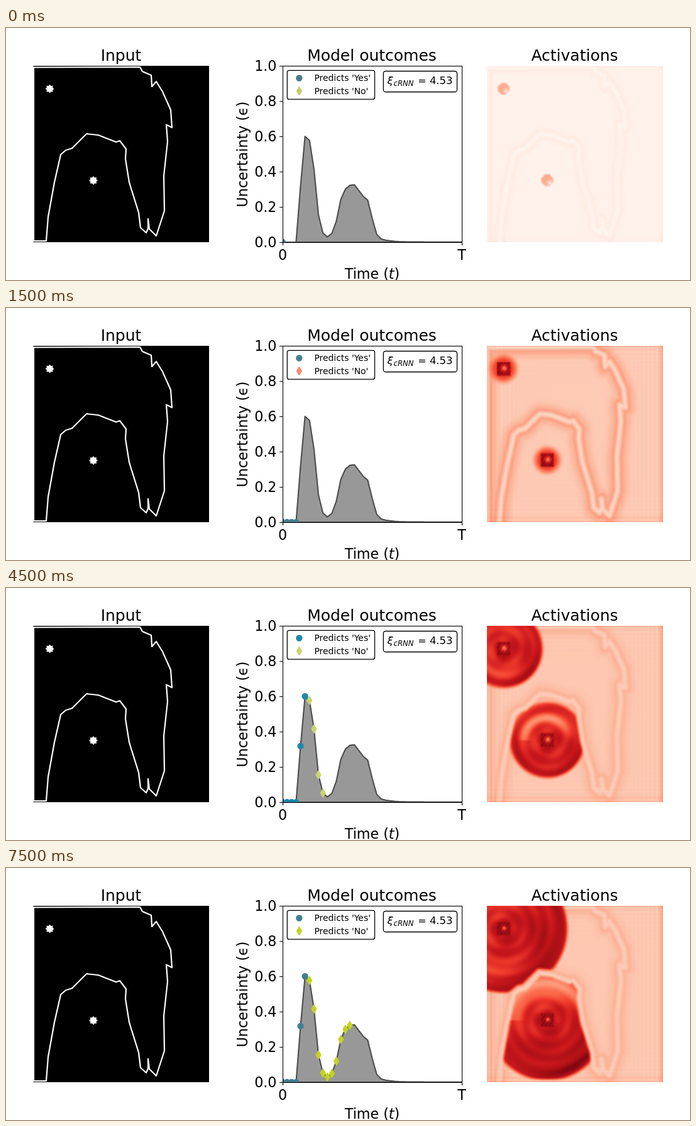
These frames come from a looping animation (1088 px wide and 400 px high, 8000 ms). An HTML page with a canvas:

```html
<!DOCTYPE html>
<html lang="en">
<head>
<meta charset="utf-8">
<title>Model outcomes</title>
<style>
  html, body { margin: 0; width: 100%; height: 100%; overflow: hidden; background: #fff; }
  svg { position: absolute; left: 0; top: 0; }
  canvas { position: absolute; left: 765px; top: 60px; width: 280px; height: 280px; }
  text { font-family: "DejaVu Sans", sans-serif; font-size: 22.22px; fill: #000; }
  .title { font-size: 25px; text-anchor: middle; }
  .mid { text-anchor: middle; }
  .end { text-anchor: end; }
  .key { font-size: 13.89px; }
  .score { font-size: 16.4px; }
  .sub { font-size: 11.67px; }
  .it { font-style: oblique; }
  .axis { fill: none; stroke: #000; stroke-width: 1.1; }
  .box { fill: #fff; stroke: #000; stroke-width: 1.3; }
  .mark { stroke-width: 2.08; stroke-linejoin: round; }
</style>
</head>
<body>
<svg width="1088" height="400" viewBox="0 0 1088 400">
  <defs>
    <clipPath id="axes"><rect x="440" y="60" width="285.5" height="280.5"/></clipPath>
    <filter id="soft"><feGaussianBlur stdDeviation="0.55"/></filter>
  </defs>
  <text class="title" x="183" y="52">Input</text>
  <text class="title" x="582" y="52">Model outcomes</text>
  <text class="title" x="904.5" y="52">Activations</text>

  <rect x="43.5" y="60" width="279.5" height="280"/>
  <path id="outline" fill="none" stroke="#fff" stroke-width="2.2" stroke-linejoin="round" filter="url(#soft)"/>
  <g id="stars" fill="#fff"></g>

  <g clip-path="url(#axes)">
    <path id="area" fill="#989898" stroke="#4c4c4c" stroke-width="2.1" stroke-linejoin="round"/>
    <g id="points"></g>
  </g>
  <path id="ticks" class="axis"/>
  <rect class="axis" x="440.5" y="60.5" width="285" height="280"/>
  <g id="tickLabels"></g>
  <text class="mid" x="440" y="368">0</text>
  <text class="mid" x="725" y="368">T</text>
  <text class="mid" x="582.5" y="398">Time (<tspan class="it">t</tspan>)</text>
  <text class="mid" transform="translate(383.5 200.5) rotate(-90)">Uncertainty (ϵ)</text>

  <rect class="box" x="447.3" y="67.3" width="139.2" height="45.9" rx="3"/>
  <g id="legend"></g>
  <text class="key" x="490.5" y="84.3">Predicts 'Yes'</text>
  <text class="key" x="490.5" y="104.5">Predicts 'No'</text>
  <rect class="box" x="600.3" y="68.5" width="117.2" height="33" rx="3.5"/>
  <text class="score it" x="606.5" y="89">ξ</text>
  <text class="sub it" x="616.5" y="91.5">cRNN</text>
  <text class="score" x="655" y="89">= 4.53</text>
</svg>
<canvas id="map" width="140" height="140"></canvas>

<script>
const STEP_MS = 500, STEPS = 16;
const { sin, cos, exp, abs, min, max, hypot, atan2, floor, PI } = Math;
const $ = id => document.getElementById(id);
const clamp = (x, lo = 0, hi = 1) => min(hi, max(lo, x));
const ramp = (a, b, x) => { const t = clamp((x - a) / (b - a)); return t * t * (3 - 2 * t); };
const bump = (x, w) => exp(-(x / w) * (x / w));
const mix = (a, b, t) => a + (b - a) * t;

// Outline corners; the inner arch also bounds the lower wave.
const head = [[44,338],[44,62.5],[213,62],[217,69],[231,75],[232,93],[239,85],[249,101],
  [262,130],[264,158],[255,153.5],[257,180],[251,235],[252,290],[239,330],[228,319],[226,303]];
const arch = [[226,318],[223,325],[214,317],[211,293],[196,245],[190,208],[191,192],[181,179],
  [175,181],[147,170],[128,168],[105,191],[95,194],[87,201],[77,245],[67,300],[64,338]];
$('outline').setAttribute('d', 'M' + [...head, ...arch].join('L') + 'Z');

function star(cx, cy) {
  const pts = Array.from({ length: 16 }, (_, i) => {
    const r = i % 2 ? 5 : 7, a = i * PI / 8;
    return [cx + r * cos(a), cy + r * sin(a)];
  });
  return `<polygon points="${pts.join(' ')}"/>`;
}
$('stars').innerHTML = star(69.5, 96.5) + star(139, 242);

// Uncertainty: flat start, two peaks, decaying tail
const START = 4, FIRST_NO = 6;
const peaks = [.318, .6, .577, .415, .155, .052, .03, .05, .12, .243, .3, .322, .326, .293, .26, .238, .135, .045];
const curve = Array.from({ length: 41 }, (_, i) =>
  i < START ? 0 : peaks[i - START] ?? .001 + .018 * exp((START + peaks.length - i) / 2));
const px = i => 440 + i * 7.125, py = v => 340 - v * 280;
$('area').setAttribute('d', 'M440,340L' + curve.map((v, i) => [px(i), py(v)]).join('L') + 'L725,340Z');

let ticks = 'M440.5,340v5M725.5,340v5', labels = '';
for (let v = 0; v <= 5; v++) {
  const y = py(v / 5);
  ticks += `M440,${y + .5}h-5`;
  labels += `<text class="end" x="430.5" y="${y + 8}">${(v / 5).toFixed(1)}</text>`;
}
$('ticks').setAttribute('d', ticks);
$('tickLabels').innerHTML = labels;

// First step, 'Yes' colour, 'No' colour
const shades = [[0, '#4b7a89', '#c4cc70'], [1, '#507583', '#f87f60'], [2, '#467f8c', '#fb8a68'],
  [4, '#3f87a0', '#f59467'], [9, '#2187aa', '#c9d470'], [12, '#1a86a8', '#c3d421'],
  [14, '#417e90', '#c3d421']];
const mark = (shape, c) => `<${shape} class="mark" fill="${c}" stroke="${c}"/>`;
const dot = (x, y, c) => mark(`circle cx="${x}" cy="${y}" r="4.1"`, c);
const diamond = (x, y, c) => mark(`path d="M${x},${y - 5.9}l3.5,5.9l-3.5,5.9l-3.5,-5.9z"`, c);

function drawPlot(step) {
  const [, yes, no] = shades.filter(s => s[0] <= step).pop();
  $('legend').innerHTML = dot(466.3, 79.5, yes) + diamond(466.3, 100, no);
  $('points').innerHTML = curve.slice(0, step + 1)
    .map((v, i) => i < FIRST_NO ? dot(px(i), py(v), yes) : diamond(px(i), py(v), no)).join('');
}

// Activation map: a scalar field shown through a red colour scale
const N = 140, SIZE = 280;
const reds = ['fff5f0', 'fee0d2', 'fcbba1', 'fc9272', 'fb6a4a', 'ef3b2c', 'cb181d', 'a50f15', '67000d']
  .map(h => [0, 2, 4].map(k => parseInt(h.slice(k, k + 2), 16)));

function distance(x, y, pts) {
  let best = 1e9;
  for (let i = 1; i < pts.length; i++) {
    const [ax, ay] = pts[i - 1], dx = pts[i][0] - ax, dy = pts[i][1] - ay;
    const t = clamp(((x - ax) * dx + (y - ay) * dy) / (dx * dx + dy * dy));
    best = min(best, hypot(x - ax - t * dx, y - ay - t * dy));
  }
  return best;
}
function inside(x, y, pts) {
  let hit = false;
  pts.forEach(([ax, ay], i) => {
    const [bx, by] = pts[(i + 1) % pts.length];
    if (ay > y !== by > y && x < ax + (y - ay) / (by - ay) * (bx - ax)) hit = !hit;
  });
  return hit;
}
const region = [...arch, [64, 345], [226, 345]];
const cells = Array.from({ length: N * N }, (_, i) => {
  const u = (i % N) * 2 + 1, v = floor(i / N) * 2 + 1, x = u + 44, y = v + 60;
  const toArch = distance(x, y, arch), within = inside(x, y, region);
  return {
    u, v, line: min(toArch, distance(x, y, head)),
    inner: within ? ramp(0, 7, toArch) * ramp(1, 7, SIZE - v) : 0,
    outer: within ? 0 : ramp(4, 12, toArch)
  };
});

// Each wave: seed position, speed, limit, which side of the arch it fills,
// directions of its pale arc and its dark side
const waves = [
  { u: 26.5, v: 36.5, speed: 6.5, limit: 102, gate: 'outer', pale: 2, dark: .5, depth: .12 },
  { u: 96, v: 181.5, speed: 6.25, limit: 96, gate: 'inner', pale: -1.8, dark: 1.2, depth: .28 }
];

function background(c, step) {
  const grow = min(1, .35 + .35 * step);
  const spread = ramp(1, 3, step), late = ramp(3, 9, step);
  const right = SIZE - c.u, bottom = SIZE - c.v;
  const side = min(c.u, right), flat = min(c.v, bottom);
  let f = .21 - .19 * exp(-step);
  f += grow * ((.1 - .045 * late) * bump(c.line - 6.5, 3.2) - (.045 - .025 * late) * bump(c.line, 2.6));
  f += spread * (.06 - .035 * late) * bump(c.line - 12, 6);
  f += grow * (.12 * bump(right, 4.5) + .05 * bump(c.u, 4) + .04 * bump(flat, 4) + .03 * bump(bottom - 8, 2));
  f += spread * .025 * (cos(side * .95) * exp(-side / 24) + cos(flat * .95) * exp(-flat / 16));
  return f;
}

function addWave(f, c, w, step) {
  const R = min(4 + w.speed * step, w.limit), gate = c[w.gate];
  const dx = c.u - w.u, dy = c.v - w.v, r = hypot(dx, dy), a = atan2(dy, dx);
  if (step < 2 || !gate || r > R + 5) return f;
  const open = ramp(3, 7, step), aged = ramp(9, 15, step);
  let body = .46 + .026 * min(step, 10);
  // spiral texture, dark side, rim, hot core and the pale arc
  body += .07 * open * sin(2 * a + r * .11) * sin(r * .2 - a - step * .3);
  body += (.05 + .06 * aged) * open * cos(a - w.dark) * min(1, r / R * 1.5);
  body += .07 * open * bump(R - r - 9, 6) + .16 * bump(r, 14);
  body -= w.depth * open * bump(r - .6 * R, .1 * R + 2 + 4 * aged) * max(0, cos((a - w.pale) * .8));
  return mix(f, body, ramp(-4, step < 5 ? 10 : 5, R - r) * gate);
}

function addSeed(f, c, w, step) {
  const dx = c.u - w.u, dy = c.v - w.v, reach = max(abs(dx), abs(dy));
  const grain = sin(dx * 1.7 + dy * .6) * sin(dy * 1.3 - dx * .4);
  if (step < 2) {
    const heat = step ? .9 : .3;
    const shape = ramp(11, 8, max(reach, (abs(dx) + abs(dy)) * .75));
    return mix(f, heat * (1 + .15 * grain - .65 * bump(hypot(dx - 4, dy - 4), 4)), shape);
  }
  const spot = bump(hypot(dx - 1, dy + 1), step > 9 ? 3 : 4.5);
  return mix(f, .9 + .08 * grain - .5 * spot, ramp(11.5, 9.5, reach));
}

const ctx = $('map').getContext('2d');
const image = ctx.createImageData(N, N);
function drawMap(step) {
  cells.forEach((c, i) => {
    let f = background(c, step);
    for (const w of waves) f = addSeed(addWave(f, c, w, step), c, w, step);
    const p = clamp(f) * 8, lo = min(7, floor(p));
    for (let ch = 0; ch < 3; ch++) image.data[i * 4 + ch] = mix(reds[lo][ch], reds[lo + 1][ch], p - lo);
    image.data[i * 4 + 3] = 255;
  });
  ctx.putImageData(image, 0, 0);
}

let shown = -1;
const start = performance.now();
function render(now) {
  const step = floor(max(0, now - start) / STEP_MS) % STEPS;
  if (step !== shown) {
    shown = step;
    drawPlot(step);
    drawMap(step);
  }
  requestAnimationFrame(render);
}
render(start);
</script>
</body>
</html>
```
